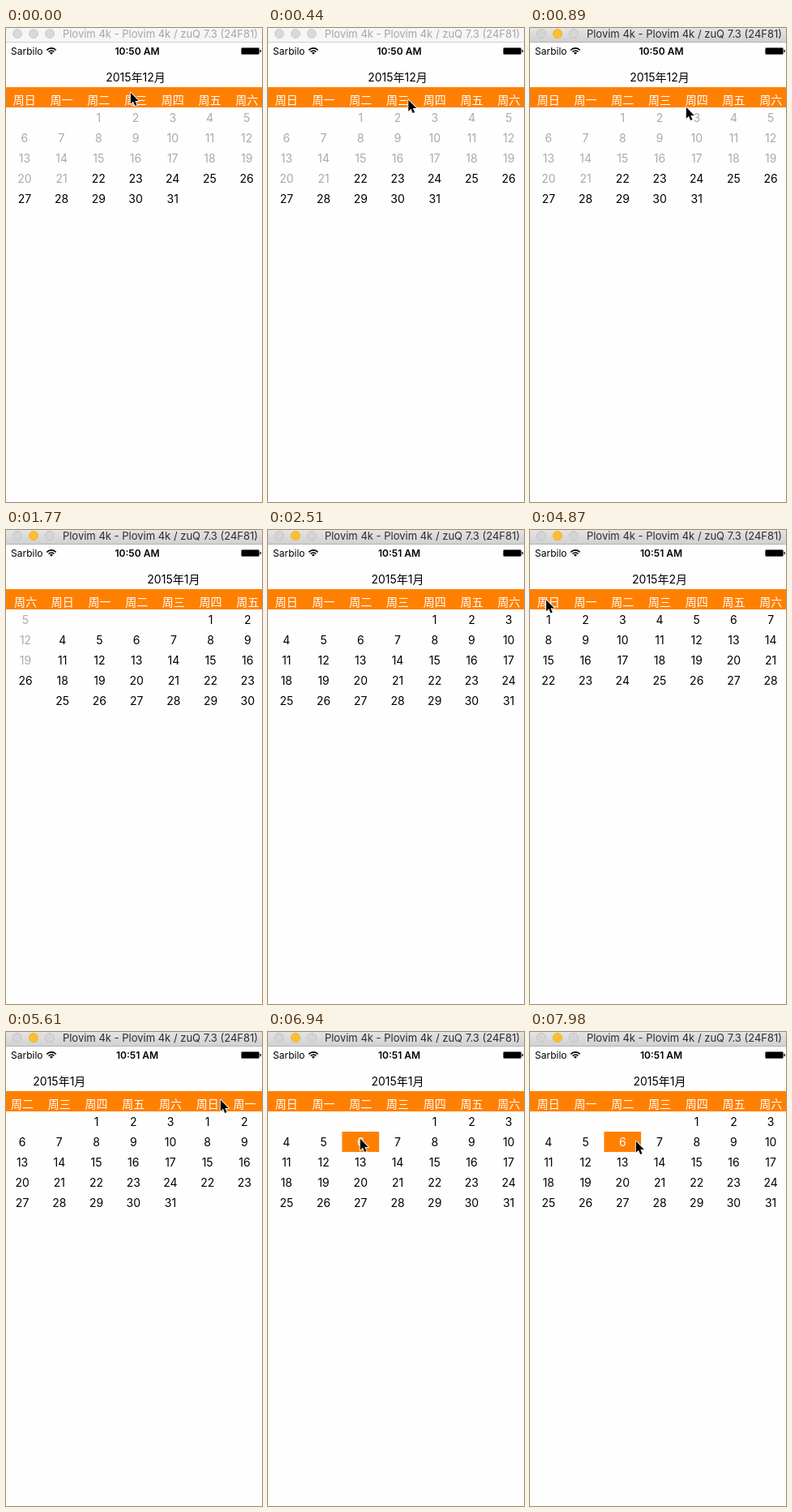
Recreate the animation shown at these times as an HTML page with a canvas. Size 316 by 585 pixels, loop 8000 ms.

```html
<!DOCTYPE html>
<html lang="zh">
<head>
<meta charset="utf-8">
<style>
  html, body { margin: 0; height: 100%; overflow: hidden; background: #fefefe; }
  canvas { display: block; }
</style>
</head>
<body>
<canvas id="stage" width="316" height="585"></canvas>
<script>
const ctx = document.getElementById('stage').getContext('2d');
const FONT = 'Inter, "Noto Sans CJK SC", "Noto Sans CJK", sans-serif';
const ORANGE = '#ff8000';
const LOOP = 8000, STEP = 147.8;
const PAGE = 320, COL = PAGE / 7, ROW = 25, GRID_TOP = 98;
const MONTHS = [11, 0, 1];             // pages from left to right, all in 2015
const TODAY = 22;
const FOCUS_STEP = 4, MINUTE_STEP = 17, PICK_STEP = 47;

// Moves: [first step, last step, ...destination]
const SWIPES = [[6, 14, PAGE], [21.4, 29, 2 * PAGE], [34, 40.3, PAGE]];
const POINTER = [
  [0, 6, 192, 97], [6, 14, 192 - PAGE, 28],
  [18, 21.4, 230, 97], [21.4, 29, 230 - PAGE, 88],
  [30, 34, 38, 85], [34, 38, 264, 83],
  [38, 45, 113, 131], [48, 50, 124, 139], [50, 54, 130, 134]
];

const ease = u => (1 - Math.cos(Math.PI * Math.min(1, Math.max(0, u)))) / 2;

function follow(origin, moves, n) {
  return moves.reduce((pos, [first, last, ...goal]) => {
    const e = ease((n - first) / (last - first));
    return pos.map((p, i) => p + (goal[i] - p) * e);
  }, origin);
}

function text(str, x, y, size, color, align = 'center', weight = 400) {
  ctx.font = `${weight} ${size}px ${FONT}`;
  ctx.textAlign = align;
  ctx.fillStyle = color;
  ctx.fillText(str, x, y);
}

function box(x, y, w, h, color, radius = 0) {
  ctx.fillStyle = color;
  ctx.beginPath();
  ctx.roundRect(x, y, w, h, radius);
  ctx.fill();
}

function titleBar(active) {
  const shade = ctx.createLinearGradient(0, 0, 0, 17);
  shade.addColorStop(0, active ? '#e4e4e4' : '#f6f6f6');
  shade.addColorStop(1, active ? '#d1d1d1' : '#f6f6f6');
  box(0, 0, 316, 17, shade);
  box(0, 17, 316, 1, active ? '#b4b4b4' : '#d2d2d2');
  [14, 34, 54].forEach((x, i) => {
    const lit = active && i === 1;
    ctx.beginPath();
    ctx.arc(x, 7, 5.5, 0, 7);
    ctx.fillStyle = lit ? '#fdbe2f' : active ? '#d5d5d5' : '#d9d9d9';
    ctx.strokeStyle = lit ? '#f3b32f' : active ? '#c3c3c3' : '#cecece';
    ctx.lineWidth = 1;
    ctx.fill();
    ctx.stroke();
  });
  text('Plovim 4k - Plovim 4k / zuQ 7.3 (24F81)', 190.5, 12, 13, active ? '#2c2c2c' : '#a6a6a6');
}

function statusBar(clock) {
  text('Sarbilo', 6, 32.5, 12, '#000', 'left');
  text(clock, 162, 32.5, 12, '#000', 'center', 600);
  ctx.strokeStyle = '#000';
  for (const [radius, width] of [[1.4, 2.8], [4.7, 1.6], [7.8, 1.6]]) {
    ctx.beginPath();
    ctx.arc(56, 32.7, radius, -Math.PI * 0.76, -Math.PI * 0.24);
    ctx.lineWidth = width;
    ctx.stroke();
  }
  box(290, 24, 23, 9, '#666', 2);
  box(291, 25, 21, 7, '#000', 1);
  box(313.5, 27, 1.3, 3, '#000');
}

function monthPage(month, left, selected) {
  const first = new Date(2015, month, 1).getDay();
  const days = new Date(2015, month + 1, 0).getDate();
  const center = col => left + (col + 0.5) * COL;
  text(`2015年${month + 1}月`, left + PAGE / 2, 65.5, 14, '#000');
  [...'日一二三四五六'].forEach((d, col) => text('周' + d, center(col), 94, 14, '#fff', 'center', 300));
  for (let day = 1; day <= days; day++) {
    const cell = first + day - 1, col = cell % 7, y = GRID_TOP + Math.floor(cell / 7) * ROW;
    const chosen = month === 0 && day === selected;
    if (chosen) box(left + col * COL, y, COL, ROW, ORANGE);
    const past = month === 11 && day < TODAY;
    text(day, center(col), y + 17.5, 14, chosen ? '#fff' : past ? '#aaa' : '#000');
  }
}

const arrow = new Path2D('M0 0V14L3.2 11L5.4 16.2L7.7 15.2L5.5 10.2H10Z');

function pointer(x, y) {
  ctx.save();
  ctx.translate(x + 0.8, y + 0.8);
  ctx.lineWidth = 1.8;
  ctx.lineJoin = 'round';
  ctx.strokeStyle = '#fff';
  ctx.stroke(arrow);
  ctx.fillStyle = '#000';
  ctx.fill(arrow);
  ctx.restore();
}

function draw(now) {
  const n = Math.floor((now % LOOP + 12) / STEP);
  const [scroll] = follow([0], SWIPES, n);
  box(0, 0, 316, 585, '#fefefe');
  titleBar(n >= FOCUS_STEP);
  statusBar(n < MINUTE_STEP ? '10:50 AM' : '10:51 AM');
  box(0, 73, 316, 25, ORANGE);
  MONTHS.forEach((month, i) => {
    const left = i * PAGE - scroll;
    if (Math.abs(left) < PAGE) monthPage(month, left, n >= PICK_STEP ? 6 : 0);
  });
  pointer(...follow([153, 79], POINTER, n));
}

const start = performance.now();
function loop() {
  draw(performance.now() - start);
  requestAnimationFrame(loop);
}
loop();
</script>
</body>
</html>
```
